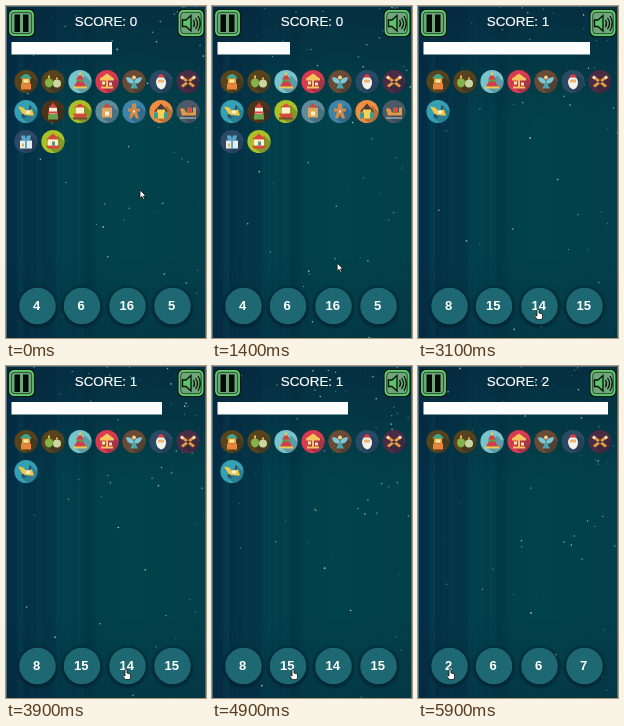
An HTML page for the animation above (6000 ms loop, 200 by 332 pixels).

```html
<!DOCTYPE html>
<html lang="en">
<head>
<meta charset="utf-8">
<title>Counting game</title>
<style>
  html, body { margin: 0; width: 100%; height: 100%; overflow: hidden; background: #04303f; }
  svg { display: block; width: 100vw; height: 100vh; }
  text { font-family: Arial, "Liberation Sans", sans-serif; fill: #fff; text-anchor: middle; }
  .score { font-size: 13.4px; stroke: #fff; stroke-width: .2px; }
  .label { font-size: 13px; font-weight: bold; }
</style>
</head>
<body>
<svg id="stage" viewBox="0 0 200 332">
  <defs>
    <linearGradient id="sky">
      <stop offset="0" stop-color="#042f47"/>
      <stop offset=".3" stop-color="#023d4a"/>
      <stop offset=".6" stop-color="#00434a"/>
      <stop offset="1" stop-color="#02404a"/>
    </linearGradient>
    <linearGradient id="dusk" x2="0" y2="1">
      <stop offset="0" stop-color="#08223a" stop-opacity=".6"/>
      <stop offset=".35" stop-color="#08223a" stop-opacity="0"/>
      <stop offset=".75" stop-color="#08223a" stop-opacity="0"/>
      <stop offset="1" stop-color="#08223a" stop-opacity=".3"/>
    </linearGradient>
    <radialGradient id="shade">
      <stop offset=".78" stop-color="#021c28" stop-opacity=".75"/>
      <stop offset="1" stop-color="#021c28" stop-opacity="0"/>
    </radialGradient>
    <clipPath id="disc"><circle r="11.6"/></clipPath>
  </defs>
  <rect width="200" height="332" fill="url(#sky)"/>
  <g id="streaks"></g>
  <rect width="200" height="332" fill="url(#dusk)"/>
  <g id="snow" fill="#d5f0f0"></g>
  <path d="M.5 332V.5H199.5V332" fill="none" stroke="#587a84" opacity=".8"/>
  <rect id="bar" x="5.5" y="36" height="12.5" fill="#fff"/>
  <g id="icons"></g>
  <g id="buttons"></g>
  <text id="score" class="score" x="100" y="20"></text>
  <g id="corners"></g>
  <g id="cursor" stroke="#111" stroke-width=".8" fill="#fff" stroke-linejoin="round">
    <path id="arrow" d="M0 0V8.2L2 6.5 3.3 9.3 4.6 8.7 3.4 6H6z"/>
    <path id="hand" d="M-1 .8Q0-.6 1 .8V4L4.6 5V8.2L3.7 10.6H-.8L-3.4 6.8Q-3.2 5.5-1 7z"/>
  </g>
</svg>
<script>
const LOOP = 6000, STEP = 100;
const $ = id => document.getElementById(id);

function add(parent, name, attrs, text) {
  const el = document.createElementNS('http://www.w3.org/2000/svg', name);
  for (const k in attrs) el.setAttribute(k, attrs[k]);
  if (text !== undefined) el.textContent = text;
  parent.appendChild(el);
  return el;
}

function random(seed) {
  return () => (seed = (seed * 16807) % 2147483647) / 2147483647;
}

// Each icon: disc colour, then colour and path pairs.
const ICONS = [
  ['#57431c', '#3fa58c', 'M-6-3Q0-12 6-3z', '#f0b23c', 'M-4-3H4V2H-4z', '#e8853a', 'M-5 2H5V8H-5z', '#f6e3b4', 'M-2-2H2V1H-2z'],
  ['#57431c', '#86b24a', 'M-8 1A4 4 0 1 1 0 1A4 5 0 0 1-8 1', '#c9d6a0', 'M0 2A4 4 0 1 1 8 2A4 4 0 0 1 0 2', '#e5b64a', 'M-5-6H-3V-3H-5zM3-4H5V-2H3z'],
  ['#78c4cb', '#d63c48', 'M0-8L4-2H2L6 5H-6L-2-2H-4z', '#58a34c', 'M-3-2H3L4 0H-4z', '#f2c84b', 'M-1-9H1V-6H-1zM-7 5H7V7H-7z'],
  ['#d83a50', '#f5c45c', 'M-7-3L0-8 7-3V-1H-7zM-1-1H1V6H-1zM-6 5H6V7H-6z', '#fae6b0', 'M-5 0H-2V3H-5zM2 1H5V4H2z'],
  ['#6b4a34', '#7cc8d4', 'M-8-4Q-3-5 0 0Q3-5 8-4Q7 3 0 2Q-7 3-8-4', '#4fa3a8', 'M0-1L4 7H-4z', '#f2cf91', 'M-2-4A2 2 0 1 1 2-4A2 2 0 0 1-2-4'],
  ['#2c4a66', '#f3f3ed', 'M-5 0Q-4-5 0-5Q5-4 5 1Q5 7 0 8Q-5 6-5 0', '#d73b3d', 'M-4-4Q0-11 4-4z', '#efb36d', 'M-3-2H3V1H-3z'],
  ['#4c2c44', '#e39a45', 'M-8-4L-6-6 7 4 5 6zM8-4L6-6-7 4-5 6z', '#f3dfc0', 'M-8-4L-6-6-4-4-6-2zM8-4L6-6 4-4 6-2z'],
  ['#35a0b4', '#f1c947', 'M-8-5L-3-4 0-1 6-2 8 4 4 4-3 3z', '#304f6b', 'M-3 2L0 6-2 7-5 4zM3-6H5V-2H3z', '#f7efe0', 'M0-1H4V2H0z'],
  ['#4b341a', '#f3ecd8', 'M-4-4H4V3H-4z', '#d2423c', 'M-4-4L0-9 4-4zM-5 0H5V2H-5z', '#6aa04a', 'M-5 3H5V8H-5z'],
  ['#a9c027', '#d9463c', 'M-6-4L0-8 6-4zM-7 2H7L5 6H-5z', '#fff0cb', 'M-4-4H4V2H-4z', '#74462f', 'M-7 6H7V8H-7z'],
  ['#5f8c9c', '#e0a660', 'M-5-4H5V6H-5z', '#c84a40', 'M-5-4L0-8 5-4z', '#fff0d0', 'M-2 0H2V4H-2z'],
  ['#3d84aa', '#d18b48', 'M-2-8H2V-3H6V0H3L5 7H2L0 3-2 7H-5L-3 0H-6V-3H-2z', '#f3e4c5', 'M-1-1H1V1H-1z'],
  ['#ef8d40', '#4b3a34', 'M0-8L7 0H-7z', '#f6d254', 'M-4-2H4V7H-4z', '#3f9a92', 'M-7 1H-3V7H-7zM3 1H7V7H3z'],
  ['#4c5a66', '#e39a45', 'M-8-3H-4L-2 1H5V-4H8V4H-6z', '#c9d2d4', 'M-8 6H8V7H-8z', '#d2523c', 'M-1-4H4V1H-1z'],
  ['#2c4a66', '#e8eef0', 'M-6-1H6V7H-6z', '#58a9cc', 'M-1-1H1V7H-1zM-5-6H-1L0-2 1-6H5L4-1H-4z', '#e8b04a', 'M-4 2H-2V5H-4z'],
  ['#a9c027', '#d9463c', 'M-7-2L0-8 7-2zM-7 4H7L5 7H-5z', '#fff0cb', 'M-5-2H5V4H-5z', '#5a8a8a', 'M-1 0H2V4H-1z']
];

const icons = ICONS.map(([disc, ...parts], i) => {
  const g = add($('icons'), 'g', {
    transform: `translate(${20 + i % 7 * 27} ${75.5 + Math.floor(i / 7) * 30})`
  });
  add(g, 'circle', { r: 11.6, fill: disc });
  add(g, 'path', { d: 'M5-6L14 3 5 14-5 6z', fill: '#102030', opacity: .25, 'clip-path': 'url(#disc)' });
  for (let p = 0; p < parts.length; p += 2) add(g, 'path', { fill: parts[p], d: parts[p + 1] });
  return g;
});

const BUTTON_X = [31.5, 76, 121.5, 166.5], BUTTON_Y = 300;
const labels = BUTTON_X.map(x => {
  add($('buttons'), 'circle', { cx: x, cy: BUTTON_Y + 1, r: 22.5, fill: 'url(#shade)' });
  add($('buttons'), 'circle', { cx: x, cy: BUTTON_Y, r: 18.3, fill: '#1d6872' });
  return add($('buttons'), 'text', { class: 'label', x: x - .8, y: 303.7 });
});

function cornerButton(x) {
  const g = add($('corners'), 'g', { transform: `translate(${x} 3)` });
  add(g, 'rect', { width: 27, height: 28, rx: 5, fill: '#0a1a16' });
  add(g, 'rect', { x: 2, y: 2, width: 23, height: 24, rx: 4, fill: '#6fa67a', stroke: '#62d070', 'stroke-width': 1.8 });
  add(g, 'rect', { x: 3.3, y: 3.3, width: 20.4, height: 21.4, rx: 3, fill: 'none', stroke: '#16301f', 'stroke-width': .8 });
  return g;
}
add(cornerButton(2), 'path', { d: 'M6.5 5.5H12V23H6.5zM15 5.5H20.5V23H15z', fill: '#050c08' });
const sound = cornerButton(171.5);
add(sound, 'path', {
  d: 'M5 11H8.5L13.5 6.5V22L8.5 17.5H5z', fill: '#5cc468', stroke: '#061009', 'stroke-width': 1.3
});
add(sound, 'path', {
  d: 'M16 11Q18 14.5 16 18M18 9Q22 14.5 18 20M20.5 7Q25 14.5 20.5 22',
  fill: 'none', stroke: '#061009', 'stroke-width': 1.2
});

const rnd = random(4217);
for (let i = 0; i < 16; i++) {
  add($('streaks'), 'rect', {
    x: rnd() * 95, y: 0, width: 2 + rnd() * 6, height: 332,
    fill: i % 2 ? '#0b5a62' : '#03202f', opacity: .05 + rnd() * .09
  });
}

// Flakes gain speed as they fall, so they crowd near the top.
const flakes = Array.from({ length: 60 }, () => ({
  x: 200 * Math.sqrt(rnd()), phase: rnd(), rate: .06 + rnd() * .05, drift: rnd() * 6 - 3,
  el: add($('snow'), 'circle', { r: .4 + rnd() * .5, opacity: .25 + rnd() * .55 })
}));

// time, score, icons shown, bar end, answers
const ROUNDS = [
  [0, 0, 16, 106, [4, 6, 16, 5]],
  [2000, 1, 8, 194, [8, 15, 14, 15]],
  [5700, 2, 7, 194, [2, 6, 6, 7]]
];

const PATH = [
  [0, 134, 184], [700, 133, 184], [1000, 133, 186], [1700, 120, 303], [4300, 120, 303],
  [4600, 100, 317], [4900, 81, 303], [5200, 56, 320], [5500, 32, 303], [6000, 32, 303]
];

function pointer(t) {
  const i = PATH.findIndex(p => p[0] > t);
  const [t0, x0, y0] = PATH[i - 1], [t1, x1, y1] = PATH[i];
  const u = (t - t0) / (t1 - t0), e = u * u * (3 - 2 * u);
  return [x0 + (x1 - x0) * e, y0 + (y1 - y0) * e];
}

function draw(t) {
  const [start, score, count, end, answers] = ROUNDS.filter(r => r[0] <= t).pop();
  $('score').textContent = 'SCORE: ' + score;
  $('bar').setAttribute('width', end - 5.5 - (t - start) * .02);
  icons.forEach((g, i) => g.setAttribute('visibility', i < count ? 'visible' : 'hidden'));
  labels.forEach((el, i) => el.textContent = answers[i]);

  for (const f of flakes) {
    const p = (f.phase + f.rate * t / 1000) % 1;
    f.el.setAttribute('cx', f.x + f.drift * p * 4);
    f.el.setAttribute('cy', 332 * p ** 1.8);
  }

  const [x, y] = pointer(t);
  const over = BUTTON_X.some(bx => Math.hypot(x - bx, y - BUTTON_Y) < 18.3);
  $('cursor').setAttribute('transform', `translate(${x} ${y})`);
  $('hand').setAttribute('visibility', over ? 'visible' : 'hidden');
  $('arrow').setAttribute('visibility', over ? 'hidden' : 'visible');
}

const begin = performance.now();
function tick() {
  const t = (performance.now() - begin) % LOOP;
  draw(Math.floor(t / STEP) * STEP);
  requestAnimationFrame(tick);
}
tick();
</script>
</body>
</html>
```
